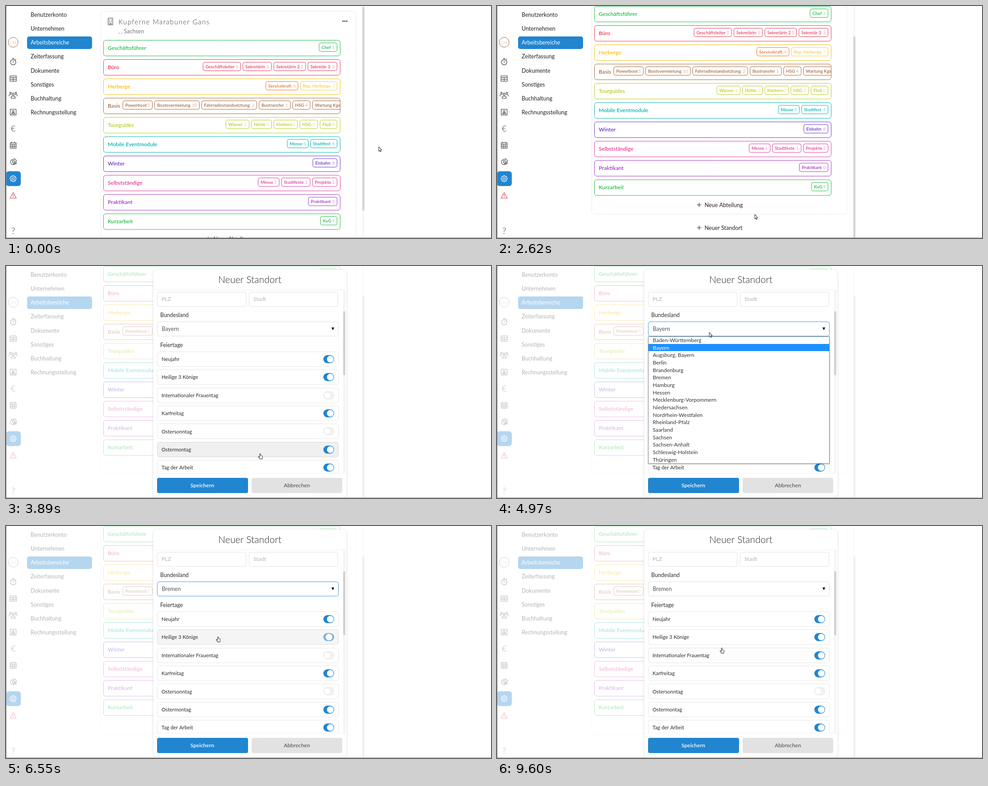
Write an HTML page with a canvas that moves like this. It is 1082x518 px and loops after 9.62 s.

```html
<!DOCTYPE html>
<html lang="de">
<head>
<meta charset="utf-8">
<title>Arbeitsbereiche</title>
<style>
html, body { margin: 0; width: 100%; height: 100%; overflow: hidden; background: #fff; }
canvas { display: block; }
</style>
</head>
<body>
<canvas id="stage" width="1082" height="518"></canvas>
<script>
const ctx = document.getElementById('stage').getContext('2d');
const W = 1082, H = 518, LOOP = 9620;
const BLUE = '#2185d0', INK = '#2b2b2b';
const FONT = 'Lato, "Open Sans", sans-serif';

const clamp = (v, a = 0, b = 1) => Math.min(b, Math.max(a, v));
const ramp = (t, start, len) => {
  const k = clamp((t - start) / len);
  return k * k * (3 - 2 * k);
};

// Pointer path: time, x, y
const PATH = [
  [0, 831, 314], [310, 831, 314], [600, 808, 306], [880, 797, 301],
  [1450, 797, 301], [1550, 797, 312], [1750, 797, 365], [1850, 795, 384],
  [2010, 782, 393], [2320, 782, 393], [2620, 575, 465], [2800, 510, 484],
  [2980, 492, 488], [3160, 492, 488], [3500, 535, 465], [3700, 567, 424],
  [3890, 567, 420], [4080, 473, 148], [5460, 473, 148], [5790, 468, 222],
  [6000, 469, 240], [6220, 470, 246], [6500, 470, 246], [7000, 495, 254],
  [7410, 514, 259], [7950, 514, 259], [8300, 520, 284], [8550, 518, 288],
  [8800, 510, 258], [8900, 510, 258], [9600, 501, 272]
];

function pointer(t) {
  let i = 1;
  while (i < PATH.length - 1 && PATH[i][0] < t) i++;
  const [t0, x0, y0] = PATH[i - 1], [t1, x1, y1] = PATH[i];
  const k = clamp((t - t0) / (t1 - t0));
  return { x: x0 + (x1 - x0) * k, y: y0 + (y1 - y0) * k };
}

const NAV = ['Benutzerkonto', 'Unternehmen', 'Arbeitsbereiche', 'Zeiterfassung',
  'Dokumente', 'Sonstiges', 'Buchhaltung', 'Rechnungsstellung'];

// Chips: left edge, label, count, optional colour
const TEAMS = [
  ['Geschäftsführer', '#21ba45', [[698, 'Chef', 1]]],
  ['Büro', '#e8395a', [[439, 'Geschäftsleiter', 1], [528, 'Sekretärin', 1], [597, 'Sekretärin 2', 1], [673, 'Sekretär 3', 3]]],
  ['Herberge', '#fbbd08', [[579, 'Servicekraft', 4, '#f2711c'], [656, 'Rep. Herberge', 7, '#fbcb3c']]],
  ['Basis', '#a5673f', [[260, 'Powerboot', 5], [331, 'Bootsvermietung', 10], [436, 'Fahrradinstandsetztung', 2], [564, 'Bustransfer', 1], [639, 'HSG', 4], [683, 'Wartung Kgs', 1]]],
  ['Tourguides', '#b5cc18', [[490, 'Wasser', 1], [547, 'Höhle', 0], [597, 'Klettern', 0], [655, 'HSG', 0], [700, 'Floß', 0]]],
  ['Mobile Eventmodule', '#00b5ad', [[627, 'Messe', 8], [679, 'Stadtfest', 4]]],
  ['Winter', '#6435c9', [[684, 'Eisbahn', 6]]],
  ['Selbstständige', '#e03997', [[562, 'Messe', 1], [614, 'Stadtfeste', 1], [683, 'Projekte', 2]]],
  ['Praktikant', '#a333c8', [[674, 'Praktikant', 0]]],
  ['Kurzarbeit', '#21ba45', [[701, 'KuG', 9]]]
];

const STATES = ['Baden-Württemberg', 'Bayern', 'Augsburg, Bayern', 'Berlin', 'Brandenburg',
  'Bremen', 'Hamburg', 'Hessen', 'Mecklenburg-Vorpommern', 'Niedersachsen',
  'Nordrhein-Westfalen', 'Rheinland-Pfalz', 'Saarland', 'Sachsen', 'Sachsen-Anhalt',
  'Schleswig-Holstein', 'Thüringen'];

const HOLIDAYS = ['Neujahr', 'Heilige 3 Könige', 'Internationaler Frauentag', 'Karfreitag',
  'Ostersonntag', 'Ostermontag', 'Tag der Arbeit'];

const OPEN = 3190, LIST_ON = 4560, LIST_OFF = 6480, CLICK_A = 7960, CLICK_B = 8400;
const rowY = i => 208 + i * 40.35;
const listOpen = t => t >= LIST_ON && t < LIST_OFF;
const innerScroll = t => 128 * ramp(t, 3480, 300);

function text(str, x, y, size, color, o = {}) {
  ctx.font = `${o.weight || 400} ${size}px ${FONT}`;
  ctx.textAlign = o.align || 'left';
  ctx.letterSpacing = (o.gap || 0) + 'px';
  ctx.fillStyle = color;
  ctx.fillText(str, x, y + size * 0.36);
  ctx.letterSpacing = '0px';
}

function box(x, y, w, h, r, fill, stroke) {
  ctx.beginPath();
  ctx.roundRect(x, y, w, h, r);
  if (fill) { ctx.fillStyle = fill; ctx.fill(); }
  if (stroke) { ctx.strokeStyle = stroke; ctx.lineWidth = 1; ctx.stroke(); }
}

function icon(d, x, y, color = '#333', fill) {
  const p = new Path2D(d);
  ctx.save();
  ctx.translate(x, y);
  ctx.lineJoin = ctx.lineCap = 'round';
  ctx.lineWidth = 1.1;
  if (fill) { ctx.fillStyle = fill; ctx.fill(p); }
  ctx.strokeStyle = color;
  ctx.stroke(p);
  ctx.restore();
}

const circle = (x, y, r) => `M${x + r} ${y}a${r} ${r} 0 1 0 ${-2 * r} 0a${r} ${r} 0 1 0 ${2 * r} 0`;

function gear() {
  let d = '';
  for (let i = 0; i < 8; i++) {
    [[-0.3, 5], [-0.17, 7], [0.17, 7], [0.3, 5]].forEach(([a, r]) => {
      const q = i * Math.PI / 4 + a;
      d += (d ? 'L' : 'M') + (r * Math.cos(q)).toFixed(2) + ' ' + (r * Math.sin(q)).toFixed(2);
    });
  }
  return d + 'Z' + circle(0, 0, 2.3);
}

const ICONS = [
  [124, circle(0, 1.5, 6) + 'M-2 -7H2M0 -7V-4.5M0 -1.5V2M4.8 -4.2L6 -5.4'],
  [162, 'M-7 -6H7V6H-7ZM-7 -2.5H7M0 -2.5V6M-7 1.8H7'],
  [199, circle(0, -2, 2.4) + circle(-6, -5, 1.7) + circle(6, -5, 1.7) +
    'M-4.5 7V5.5Q-4.5 2.5 -1.5 2.5H1.5Q4.5 2.5 4.5 5.5V7ZM-9 2V0.5Q-9 -1.5 -7 -1.5H-4.5M9 2V0.5Q9 -1.5 7 -1.5H4.5'],
  [237, 'M-6.5 -6.5H6.5V6.5H-6.5Z' + circle(0, -1.8, 1.9) + 'M-3.6 4V3.3Q-3.6 1.6 -1.8 1.6H1.8Q3.6 1.6 3.6 3.3V4Z'],
  [311, 'M-6.5 -5.5H6.5V6.5H-6.5ZM-6.5 -2.2H6.5M-6.5 2.2H6.5M-2.2 -2.2V6.5M2.2 -2.2V6.5M-3.5 -7.5V-5.5M3.5 -7.5V-5.5'],
  [348, 'M-1.5 -5.5A6 6 0 1 0 3 5.5L-1.5 1ZM1.5 -7A6 6 0 0 1 7.2 -1H1.5ZM2 1.6H7.2A6 6 0 0 1 5.4 5.2Z']
];
const GEAR = gear();

function sidebar() {
  box(5, 70, 22, 22, 11, null, '#a5673f');
  text('LM', 16, 81, 10, '#e3cfc1', { align: 'center' });
  ICONS.forEach(([y, d]) => icon(d, 16, y));
  text('€', 16, 273.5, 18, '#333', { weight: 300, align: 'center' });
  box(0, 369, 33, 33, 6, BLUE);
  icon(GEAR, 16, 385.5, '#fff');
  icon('M0 -6.5L7 6H-7ZM0 -2V2M0 3.8V4.2', 16, 423, '#e0304a');
  text('?', 16, 501.5, 20, '#333', { weight: 300, align: 'center' });

  box(47, 68, 145, 28, 5, BLUE);
  NAV.forEach((s, i) => text(s, 55, 19.3 + i * 31.2, 12.4, i === 2 ? '#fff' : '#222'));
}

function team([name, color, chips], y) {
  box(217.5, y + 0.5, 528, 35, 5, null, color);
  text(name, 227, y + 17.5, 12.1, color, { weight: 600 });
  ctx.save();
  ctx.beginPath();
  ctx.rect(218, y, 527, 36);
  ctx.clip();
  chips.forEach(([x, label, count, own], i) => {
    const tone = own || color;
    const end = i + 1 < chips.length ? chips[i + 1][0] - 4 : name === 'Basis' ? 766 : 739;
    box(x + 0.5, y + 6.5, end - x - 1, 19, 4, null, tone);
    text(label, x + 6, y + 16, 9.8, tone, { weight: 600 });
    ctx.globalAlpha *= 0.5;
    text(String(count), end - 6, y + 16, 10, tone, { align: 'right' });
    ctx.globalAlpha *= 2;
  });
  ctx.restore();
}

function addButton(label, y) {
  icon('M-4.5 0H4.5M0 -4.5V4.5', 451, y, '#222');
  text(label, 463, y, 12.5, '#222');
}

function page(t, p) {
  sidebar();
  const scroll = t < 1450 ? 0 : clamp((pointer(Math.min(t, 2010)).y - 301) / 0.868, 0, 76);
  ctx.save();
  ctx.translate(0, -scroll);
  box(211.5, 11.5, 569, 529, 6, '#fff', '#ececec');
  icon('M-5 -7.5H5V7.5H-5ZM-1.5 7.5V4H1.5V7.5M-2.5 -4.5h1M1.5 -4.5h1M-2.5 -1.5h1M1.5 -1.5h1M-2.5 1.3h1M1.5 1.3h1', 233, 34.5, '#444');
  ctx.fontVariantCaps = 'small-caps';
  text('Kupferne Marabuner Gans', 251, 35.5, 15, '#333', { weight: 300, gap: 1.4 });
  ctx.fontVariantCaps = 'normal';
  text(', , Sachsen', 251, 56, 12.5, '#777');
  [751.8, 756, 760.2].forEach(x => box(x - 1.4, 32.6, 2.8, 2.8, 1.4, '#222'));
  TEAMS.forEach((row, i) => team(row, 76 + i * 43.05));
  addButton('Neue Abteilung', 520);
  addButton('Neuer Standort', 571);
  ctx.restore();

  const hot = t < 2010 && p.x < 800 && p.x >= 790;
  ctx.fillStyle = '#f5f5f5';
  ctx.fillRect(795, 0, 4, H);
  box(795, 1.5 + scroll * 0.868, 4.5, 456, 2, hot ? '#b8b8b8' : '#d3d3d3');
}

function hitRow(t) {
  if (t < OPEN + 200 || listOpen(t)) return -1;
  const p = pointer(t), off = 128 - innerScroll(t);
  if (p.y > 462) return -1;
  return HOLIDAYS.findIndex((_, i) => Math.abs(p.y - rowY(i) - off) < 17);
}

// Share of the recent past the pointer spent on a row gives a soft hover
function hover(t, i) {
  let n = 0;
  for (let k = 0; k < 6; k++) if (hitRow(t - k * 22) === i) n++;
  return n / 6;
}

function toggleState(t, i) {
  if (i === 1) return 1 - ramp(t, LIST_OFF, 160) + ramp(t, CLICK_A, 160);
  if (i === 2) return ramp(t, CLICK_B, 160);
  return i === 4 ? 0 : 1;
}

function toggle(y, k) {
  box(708.5, y - 8.5, 23, 17, 8.5, '#f2f2f2', '#e6e6e6');
  ctx.save();
  ctx.globalAlpha *= k;
  box(708, y - 9, 24, 18, 9, BLUE);
  ctx.restore();
  const x = 716.5 + 7 * k;
  box(x - 7.5, y - 7.5, 15, 15, 7.5, '#fff', k < 0.5 ? '#e6e6e6' : null);
}

function field(x, y, w, hint) {
  box(x + 0.5, y - 15.5, w - 1, 32, 4, '#fff', '#e2e2e2');
  text(hint, x + 10, y, 12.3, '#b3b3b3');
}

function form(t) {
  text('Name', 344, -62, 12.4, INK);
  field(337, -31, 404, 'Name');
  text('Adresse', 344, 5, 12.4, INK);
  field(337, 36, 404, 'Straße');
  field(337, 74, 199, 'PLZ');
  field(542, 74, 199, 'Stadt');
  text('Bundesland', 344, 110, 12.4, INK);

  const focus = t >= 4500 && t < CLICK_A;
  box(337.5, 124.5, 404, 32, 4, '#fff', focus ? '#4a9ddb' : '#e0e0e0');
  text(t < LIST_OFF ? 'Bayern' : 'Bremen', 347.5, 140.5, 12.4, '#555');
  ctx.fillStyle = '#111';
  ctx.beginPath();
  ctx.moveTo(726, 137.3);
  ctx.lineTo(732.4, 137.3);
  ctx.lineTo(729.2, 143.5);
  ctx.fill();

  text('Feiertage', 344, 177, 12.4, INK);
  HOLIDAYS.forEach((name, i) => {
    const y = rowY(i), h = hover(t, i);
    const back = 255 - 15 * h, edge = 230 - 14 * h;
    box(337.5, Math.round(y - 17) + 0.5, 404, 33, 5, `rgb(${back},${back},${back})`, `rgb(${edge},${edge},${edge})`);
    text(name, 347, y, 11.4, INK);
    toggle(Math.round(y), toggleState(t, i));
  });
}

function dropdown(p) {
  ctx.save();
  ctx.shadowColor = 'rgba(0,0,0,.3)';
  ctx.shadowBlur = 4;
  ctx.shadowOffsetY = 1;
  box(337.5, 157.5, 404, 283.5, 0, '#fff');
  ctx.restore();
  const pitch = 16.67;
  const over = p.y < 158 ? 1 : Math.floor((p.y - 157.6) / pitch);
  STATES.forEach((name, i) => {
    const y = 165.7 + i * pitch;
    if (i === over) {
      ctx.fillStyle = '#1e90ff';
      ctx.fillRect(338, Math.round(y - 8), 403, 16);
    }
    text(name, 347.5, y, 12, i === over ? '#fff' : '#333');
  });
  box(337.5, 157.5, 404, 283.5, 0, null, '#7b8088');
}

function modal(t, p) {
  const k = ramp(t, OPEN, 220);
  if (!k) return;
  ctx.fillStyle = `rgba(255,255,255,${0.667 * k})`;
  ctx.fillRect(0, 0, 800, H);

  ctx.save();
  ctx.globalAlpha = k;
  const s = 0.92 + 0.08 * k;
  ctx.translate(544, 262);
  ctx.scale(s, s);
  ctx.translate(-544, -262);

  ctx.save();
  ctx.shadowColor = 'rgba(0,0,0,.16)';
  ctx.shadowBlur = 5;
  ctx.shadowOffsetY = 1;
  box(328.5, 8, 431, 509, 8, '#fff');
  ctx.restore();
  text('Neuer Standort', 544, 30.5, 21, '#222', { weight: 300, align: 'center', gap: 0.1 });
  ctx.fillStyle = '#f1f1f1';
  ctx.fillRect(332, 53, 424, 1);
  ctx.fillRect(332, 462, 424, 1);

  const scroll = innerScroll(t);
  ctx.save();
  ctx.beginPath();
  ctx.rect(329, 54, 430, 408);
  ctx.clip();
  ctx.fillStyle = '#f5f5f5';
  ctx.fillRect(752, 54, 5, 408);
  box(752, 55.5 + scroll * 0.355, 5, 143, 2.5, '#d2d2d2');
  ctx.translate(0, 128 - scroll);
  form(t);
  ctx.restore();

  box(337, 473, 203, 34, 4, BLUE);
  text('Speichern', 438, 490, 12.1, '#fff', { weight: 600, align: 'center' });
  box(548, 473, 202, 34, 4, '#e2e2e2');
  text('Abbrechen', 649, 490, 12.2, '#4a4a4a', { align: 'center' });
  if (listOpen(t)) dropdown(p);
  ctx.restore();
}

const ARROW = 'M0 0V9.8L2.3 7.8L3.8 11L5.2 10.4L3.8 7.2H6.8Z';
const HAND = 'M-0.9 0.4Q0 -0.6 0.9 0.4V4L4.2 4.7Q5.4 5 5.3 6.2L4.6 9.4V11.6H-1.2V10.2L-4 7Q-4.2 5.8 -2.8 6L-0.9 7.4Z';

function drawPointer(t, p) {
  const onAdd = t > 2500 && t < OPEN + 100 && p.y > 482 && p.x > 440 && p.x < 555;
  icon(onAdd || hitRow(t) >= 0 ? HAND : ARROW, p.x + 0.5, p.y + 0.5, '#444', '#fff');
}

function draw(t) {
  const p = pointer(t);
  ctx.globalAlpha = 1;
  ctx.fillStyle = '#fff';
  ctx.fillRect(0, 0, W, H);
  page(t, p);
  modal(t, p);
  ctx.fillStyle = '#8a8a8a';
  ctx.fillRect(0, 0, 1, H);
  ctx.fillRect(0, H - 1, W, 1);
  drawPointer(t, p);
}

const start = performance.now();
function tick() {
  draw((performance.now() - start) % LOOP);
  requestAnimationFrame(tick);
}
tick();
</script>
</body>
</html>
```
